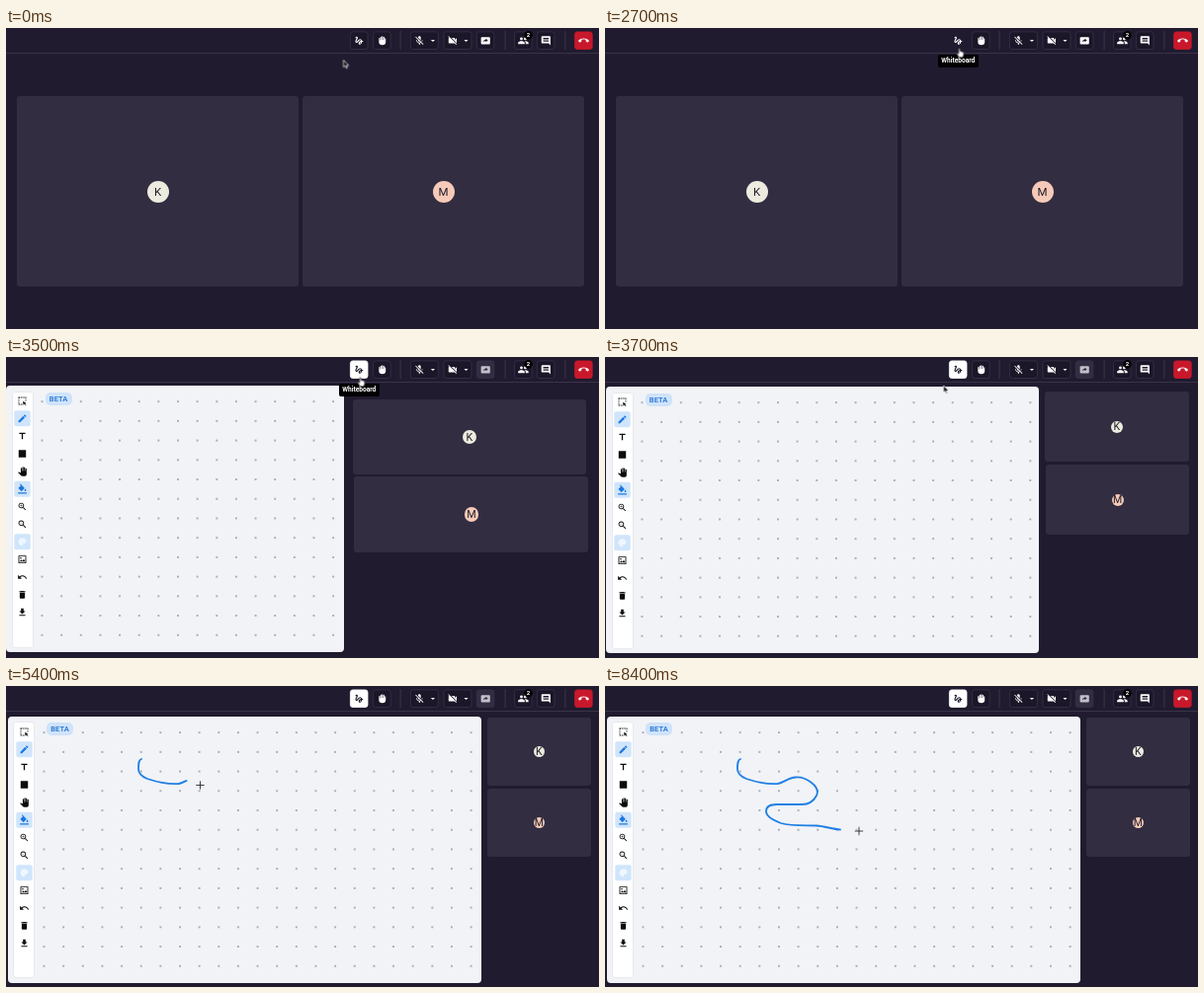
An HTML page that plays this animation: 600 px wide and 305 px high, repeating every 8500 ms.

```html
<!DOCTYPE html>
<html lang="en">
<head>
<meta charset="utf-8">
<title>Whiteboard in a call</title>
<style>
:root {
  --loop: 8.5s linear infinite;
  --curve: path("M137 74C134 75 134 79 134 84C134 89 138 92 143 94C152 97 164 100 175 99C181 98 185 93 193 92.5C200 92 205 95 209 98C214 102 216 107 214 111C211 117 206 120 199 120L174 120C167 120 163 122 163 127C163 132 170 136 178 139C188 142 204 141 214 141.5C222 142 230 145 238 145.5");
}
html, body { margin: 0; width: 100%; height: 100%; overflow: hidden; background: #211b30; }
body { position: relative; font-family: Roboto, sans-serif; }
body > *, .bar, .beta { position: absolute; box-sizing: border-box; }
svg { position: absolute; left: 0; top: 0; overflow: visible; }
path { fill-rule: evenodd; }

/* header */
#head { left: 0; top: 0; width: 600px; height: 25.5px; border-bottom: 1px solid #393448; }
.btn { fill: #1b1628; stroke: #383348; stroke-width: .8; }
.glyph { fill: #fff; }
.sep { fill: #3b364a; }
#wbBox { animation: wbBox var(--loop); animation-timing-function: step-end; }
#wbIcon { animation: wbIcon var(--loop); animation-timing-function: step-end; }
#shareBox { animation: shareBox var(--loop); animation-timing-function: step-end; }
#shareIcon { animation: shareIcon var(--loop); animation-timing-function: step-end; }
@keyframes wbBox {
  11.76% { fill: #211b30; stroke: #211b30; }
  35.29%, 100% { fill: #fff; stroke: #fff; }
}
@keyframes wbIcon { 35.29%, 100% { fill: #171221; } }
@keyframes shareBox { 36.71%, 100% { fill: #322d41; stroke: #38334a; } }
@keyframes shareIcon { 36.71%, 100% { fill: #c3c0cb; } }

/* participants */
.tile {
  display: flex; align-items: center; justify-content: center;
  background: #322d41; border-radius: 3px;
}
.tile span {
  display: flex; align-items: center; justify-content: center;
  border-radius: 50%; color: #211d28; animation: avatar var(--loop);
}
#k { animation: tileK var(--loop); }
#m { animation: tileM var(--loop); }
#k span { background: #edebdf; }
#m span { background: #f6cab8; }
@keyframes tileK {
  0%, 36.7% { left: 11px; top: 69px; width: 285px; height: 193px; }
  36.71% { left: 11px; top: 69px; width: 564px; height: 98px; animation-timing-function: ease; }
  47.29%, 100% { left: 486.5px; top: 32px; width: 105.5px; height: 68.5px; }
}
@keyframes tileM {
  0%, 36.7% { left: 300px; top: 69px; width: 285px; height: 193px; }
  36.71% { left: 17px; top: 163.6px; width: 566px; height: 98px; animation-timing-function: ease; }
  47.29%, 100% { left: 486.5px; top: 104px; width: 105.5px; height: 68.5px; }
}
@keyframes avatar {
  0%, 36.71% { width: 22px; height: 22px; font-size: 11.5px; animation-timing-function: ease; }
  47.29%, 100% { width: 11px; height: 11px; font-size: 10.5px; }
}

/* whiteboard */
#board {
  height: 270px; overflow: hidden; border-radius: 4px; animation: board var(--loop);
  background: radial-gradient(circle, #8b8e95 .55px, transparent 1px) 26.7px 6.3px / 19.65px 19.72px #f1f3f7;
}
@keyframes board {
  0%, 36.7% { left: -3.5px; top: 25.3px; width: 0; visibility: hidden; }
  36.71% { left: -3.5px; top: 25.3px; width: 0; visibility: visible; animation-timing-function: ease; }
  47.29%, 100% { left: 1.5px; top: 30.5px; width: 479px; visibility: visible; }
}
.bar { left: 6.5px; top: 6.5px; width: 20px; height: 258px; background: #fff; border-radius: 2px; box-shadow: 0 0 2px #0002; }
.on { fill: #d0e5fb; }
.beta {
  left: 39.5px; top: 6.5px; width: 27px; height: 13px; border-radius: 5px;
  background: #cfe3fa; color: #1c6fd0; font: 500 7.6px/13px Roboto, sans-serif; text-align: center;
}
#ink {
  d: var(--curve); fill: none; stroke: #1f7fe5; stroke-width: 1.8; stroke-linecap: round; stroke-linejoin: round;
  stroke-dasharray: 100 200; animation: ink var(--loop);
}
@keyframes ink {
  0%, 57.65% { stroke-dashoffset: 100; opacity: 0; }
  57.66% { stroke-dashoffset: 100; opacity: 1; }
  63.53% { stroke-dashoffset: 73.4; }
  85.88%, 100% { stroke-dashoffset: 0; opacity: 1; }
}

/* tooltip and cursors */
#tip {
  left: 337px; top: 27px; width: 40.5px; height: 13px; border-radius: 2px; background: #000; color: #fff;
  font: 700 6.6px/13px Roboto, sans-serif; text-align: center; opacity: 0;
  animation: tip var(--loop); animation-timing-function: step-end;
}
@keyframes tip { 14.12% { opacity: 1; } 43.53%, 100% { opacity: 0; } }
#pointer { left: 0; top: 0; animation: pointer var(--loop); }
@keyframes pointer {
  0%, 3.53% { translate: 341.5px 32.5px; visibility: visible; animation-timing-function: ease-in-out; }
  11.76%, 42.35% { translate: 358.5px 20.5px; visibility: visible; }
  44.7% { translate: 327px 37px; visibility: visible; }
  44.71%, 100% { translate: 327px 37px; visibility: hidden; }
}
#arrow { animation: arrow var(--loop); animation-timing-function: step-end; }
#hand { opacity: 0; animation: hand var(--loop); animation-timing-function: step-end; }
@keyframes arrow { 11.76% { opacity: 0; } 43.53%, 100% { opacity: 1; } }
@keyframes hand { 11.76% { opacity: 1; } 43.53%, 100% { opacity: 0; } }
#cross {
  left: 0; top: 0; width: 9px; height: 9px; offset-path: var(--curve); offset-rotate: 0deg;
  animation: follow var(--loop), drift var(--loop);
}
@keyframes follow {
  0%, 57.65% { offset-distance: 0%; }
  63.53% { offset-distance: 32%; }
  85.29%, 100% { offset-distance: 100%; }
}
@keyframes drift {
  0%, 44.7% { translate: 190px -37px; visibility: hidden; }
  44.71% { translate: 190px -37px; visibility: visible; }
  48.24% { translate: 85.5px 4.5px; animation-timing-function: ease-out; }
  55.88%, 61.18% { translate: 0 0; }
  63.53% { translate: 1px 8px; }
  65.88%, 91.18% { translate: 0 0; }
  92.94%, 100% { translate: 19px 1.5px; visibility: visible; }
}
</style>
</head>
<body>
<div id="head"></div>
<svg id="tools" width="600" height="26"></svg>
<div class="tile" id="k"><span>K</span></div>
<div class="tile" id="m"><span>M</span></div>
<div id="board">
  <div class="bar"></div>
  <svg id="side" width="28" height="270"></svg>
  <div class="beta">BETA</div>
</div>
<svg width="600" height="305"><path id="ink" pathLength="100"/></svg>
<div id="tip">Whiteboard</div>
<div id="pointer">
  <svg width="8" height="10">
    <path id="arrow" d="M0 0V7.2L1.7 5.7 2.9 8.3 4 7.8 2.9 5.3H5.1Z" fill="#111" stroke="#fff" stroke-width=".7"/>
    <path id="hand" d="M-.8 .7Q0-.5 .8 .7V3.3Q1.6 2.7 2.1 3.5 2.9 3 3.4 3.9 4.4 3.6 4.4 4.7V6.7Q4.2 8 3.4 9.2H-.2Q-1.5 7.3-2.7 5.4-2.5 4.5-1.6 5L-.8 5.8Z" fill="#fff" stroke="#111" stroke-width=".6"/>
  </svg>
</div>
<div id="cross">
  <svg width="9" height="9">
    <path d="M4.5 0V9M0 4.5H9" stroke="#fff" stroke-width="2"/>
    <path d="M4.5 .3V8.7M.3 4.5H8.7" stroke="#222" stroke-width=".9"/>
  </svg>
</div>
<script>
const lens = "M15.5 14h-.79l-.28-.27C15.41 12.59 16 11.11 16 9.5 16 5.91 13.09 3 9.5 3S3 5.91 3 9.5 5.91 16 9.5 16c1.61 0 3.09-.59 4.23-1.57l.27.28v.79l5 4.99L20.49 19l-4.99-5zm-6 0C7.01 14 5 11.99 5 9.5S7.01 5 9.5 5 14 7.01 14 9.5 11.99 14 9.5 14z";
const icons = {
  gesture: "M4.59 6.89c.7-.71 1.4-1.35 1.71-1.22.5.2 0 1.03-.3 1.52-.25.42-2.86 3.89-2.86 6.31 0 1.28.48 2.34 1.34 2.98.75.56 1.74.73 2.64.46 1.07-.31 1.95-1.4 3.06-2.77 1.21-1.49 2.83-3.44 4.08-3.44 1.63 0 1.65 1.01 1.76 1.79-3.78.64-5.38 3.67-5.38 5.37 0 1.7 1.44 3.09 3.21 3.09 1.63 0 4.29-1.33 4.69-6.1H21v-2.5h-2.47c-.15-1.65-1.09-4.2-4.03-4.2-2.25 0-4.18 1.91-4.94 2.84-.58.73-2.06 2.48-2.29 2.72-.25.3-.68.84-1.11.84-.45 0-.72-.83-.36-1.92.35-1.09 1.4-2.86 1.85-3.52.78-1.14 1.3-1.92 1.3-3.28C8.95 3.69 7.31 3 6.44 3 5.12 3 3.97 4 3.72 4.25c-.36.36-.66.66-.88.93zm9.29 11.66c-.31 0-.74-.26-.74-.72 0-.6.73-2.2 2.87-2.76-.3 2.69-1.43 3.48-2.13 3.48z",
  hand: "M23 5.5V20c0 2.2-1.8 4-4 4h-7.3c-1.08 0-2.1-.43-2.85-1.19L1 14.83s1.26-1.23 1.3-1.25c.22-.19.49-.29.79-.29.22 0 .42.06.6.16.04.01 4.31 2.46 4.31 2.46V4c0-.83.67-1.5 1.5-1.5S11 3.17 11 4v7h1V1.5c0-.83.67-1.5 1.5-1.5S15 .67 15 1.5V11h1V2.5c0-.83.67-1.5 1.5-1.5s1.5.67 1.5 1.5V11h1V5.5c0-.83.67-1.5 1.5-1.5s1.5.67 1.5 1.5z",
  palm: "M3.5 6q0-1.5 1.4-1.5T6.3 6v5h1V3q0-1.5 1.5-1.5T10.300 3v7h1V1.500Q11.300 0 12.800 0t1.500 1.500V10h1V3q0-1.500 1.500-1.500T18.300 3v8h.8V7q0-1.500 1.400-1.500T21.900 7v9q0 8-9.200 8T3.500 16z",
  mic: "M19 11h-1.7c0 .74-.16 1.43-.43 2.05l1.23 1.23c.56-.98.9-2.09.9-3.28zm-4.02.17c0-.06.02-.11.02-.17V5c0-1.66-1.34-3-3-3S9 3.34 9 5v.18l5.98 5.99zM4.27 3L3 4.27l6.01 6.01V11c0 1.66 1.33 3 2.99 3 .22 0 .44-.03.65-.08l1.66 1.66c-.71.33-1.5.52-2.31.52-2.76 0-5.3-2.1-5.3-5.1H5c0 3.41 2.72 6.23 6 6.72V21h2v-3.28c.91-.13 1.77-.45 2.54-.9L19.73 21 21 19.73z",
  cam: "M21 6.5l-4 4V7c0-.55-.45-1-1-1H9.82L21 17.18zM3.27 2L2 3.27 4.73 6H4c-.55 0-1 .45-1 1v10c0 .55.45 1 1 1h12c.21 0 .39-.08.54-.18L19.73 21 21 19.73z",
  caret: "M7 10l5 5 5-5z",
  share: "M4 4h16a2 2 0 0 1 2 2v12a2 2 0 0 1-2 2H4a2 2 0 0 1-2-2V6a2 2 0 0 1 2-2zM12.500 7.500v2.300c-3.900.5-5.400 3.300-6 6 1.400-1.900 3.200-2.800 6-2.800v2.400l5-4z",
  people: "M16 11a3 3 0 1 0 0-6 3 3 0 0 0 0 6zM8 11a3 3 0 1 0 0-6 3 3 0 0 0 0 6zm0 2c-2.33 0-7 1.17-7 3.5V19h14v-2.5c0-2.33-4.67-3.5-7-3.5zm8 0c-.29 0-.62.02-.97.05 1.16.84 1.97 1.97 1.97 3.45V19h6v-2.5c0-2.33-4.67-3.5-7-3.5z",
  chat: "M22 4c0-1.1-.9-2-2-2H4c-1.1 0-2 .9-2 2v12c0 1.1.9 2 2 2h14l4 4zM18 14H6v-2h12zm0-3H6V9h12zm0-3H6V6h12z",
  hangup: "M12 9c-1.6 0-3.15.25-4.6.72v3.1c0 .39-.23.74-.56.9-.98.49-1.87 1.12-2.66 1.85-.4.37-1 .37-1.41 0L.29 13.08c-.39-.37-.39-1.030 0-1.410C3.34 8.780 7.460 7 12 7s8.660 1.780 11.710 4.670c.39.380.39 1.040 0 1.420l-2.480 2.480c-.4.380-1 .380-1.410.010-.79-.74-1.690-1.360-2.670-1.850-.33-.16-.56-.5-.56-.9v-3.100C15.150 9.250 13.600 9 12 9z",
  select: "M3 3h4v2H5v2H3zM9 3h3v2H9zM14 3h3v2h-3zM19 3h2v4h-2zM3 9h2v3H3zM3 14h2v3H3zM3 19h4v2H3zM9 19h3v2H9zM19 9h2v3h-2zM13 13l8 3-3.300 1.500L21 20.800 19.800 22l-3.200-3.200L15 22z",
  pencil: "M3 17.25V21h3.75L17.81 9.94l-3.75-3.75zM20.71 7.04c.39-.39.39-1.02 0-1.41l-2.34-2.34c-.39-.39-1.02-.39-1.41 0l-1.83 1.83 3.75 3.75z",
  text: "M5 4v3h5.5v12h3V7H19V4z",
  square: "M3.500 3.500h17v17h-17z",
  fill: "M16.56 8.94L7.62 0 6.21 1.41l2.38 2.38-5.15 5.15c-.59.59-.59 1.54 0 2.12l5.5 5.5c.59.59 1.53.59 2.12 0l5.5-5.5c.59-.58.59-1.53 0-2.12zM19 11.5s-2 2.17-2 3.5a2 2 0 0 0 4 0c0-1.33-2-3.5-2-3.5zM2 20h20v3H2z",
  zoomIn: lens + "M9 7h1v2h2v1h-2v2H9v-2H7V9h2z",
  zoomOut: lens + "M7 9h5v1H7z",
  palette: "M12 3c-4.97 0-9 4.03-9 9s4.03 9 9 9c.83 0 1.5-.67 1.5-1.5 0-.39-.15-.74-.39-1.01-.23-.26-.38-.61-.38-.99 0-.83.67-1.5 1.5-1.5H16c2.76 0 5-2.24 5-5 0-4.42-4.03-8-9-8z",
  image: "M3 3h18v18H3zM5 5v14h14V5zM6 17l3.500-4.500 2.500 3L15.500 11l3 6zM7 7h3v3H7z",
  undo: "M12.5 8c-2.65 0-5.05.99-6.9 2.6L2 7v9h9l-3.62-3.62c1.39-1.16 3.16-1.88 5.12-1.88 3.54 0 6.55 2.31 7.6 5.5l2.37-.78C21.08 11.03 17.15 8 12.5 8z",
  trash: "M6 19c0 1.1.9 2 2 2h8c1.1 0 2-.9 2-2V7H6zM19 4h-3.5l-1-1h-5l-1 1H5v2h14z",
  save: "M19 9h-4V3H9v6H5l7 7zM5 18v2h14v-2z"
};

function add(parent, tag, attrs) {
  const el = document.createElementNS("http://www.w3.org/2000/svg", tag);
  for (const key in attrs) el.setAttribute(key, attrs[key]);
  return parent.appendChild(el);
}
function icon(parent, name, x, y, size, attrs) {
  const transform = `translate(${x - size / 2} ${y - size / 2}) scale(${size / 24})`;
  return add(parent, "path", { d: icons[name], transform, ...attrs });
}

const tools = document.getElementById("tools");
function button(name, x, width, size, id) {
  const box = add(tools, "rect", { class: "btn", x, y: 3.9, width, height: 17.6, rx: 2.5 });
  const glyph = icon(tools, name, x + 8.9, 12.8, size, { class: "glyph" });
  if (id) { box.id = id + "Box"; glyph.id = id + "Icon"; }
  if (width > 20) icon(tools, "caret", x + 22.5, 12.8, 10, { class: "glyph" });
  return box;
}
button("gesture", 348.4, 17.6, 10.5, "wb");
button("palm", 371.6, 17.6, 9);
button("mic", 409.4, 28, 11);
button("cam", 443, 28, 11);
button("share", 476.3, 17.6, 11, "share");
button("people", 514.5, 17.6, 11.5);
button("chat", 537.4, 17.6, 11);
button("hangup", 575.6, 17.6, 11).setAttribute("style", "fill:#c9182b;stroke:#c9182b");
for (const x of [398.6, 504.6, 565.4]) add(tools, "rect", { class: "sep", x, y: 3, width: 1, height: 19 });
add(tools, "circle", { cx: 528.6, cy: 7.2, r: 4.2, fill: "#000" });
add(tools, "text", { x: 528.6, y: 9.3, fill: "#fff", "font-size": 6, "font-weight": 700, "text-anchor": "middle" }).textContent = "2";

const side = document.getElementById("side");
const active = { pencil: "#1c78e0", fill: "#1c78e0", palette: "#eef6ff" };
["select", "pencil", "text", "square", "hand", "fill", "zoomIn", "zoomOut", "palette", "image", "undo", "trash", "save"]
  .forEach((name, i) => {
    const y = 15.5 + 17.85 * i;
    if (active[name]) add(side, "rect", { class: "on", x: 8.3, y: y - 8, width: 16.4, height: 16, rx: 2 });
    icon(side, name, 16.5, y, name === "hand" ? 9.5 : 10.5, { fill: active[name] || "#0c0c0e" });
  });
</script>
</body>
</html>
```
